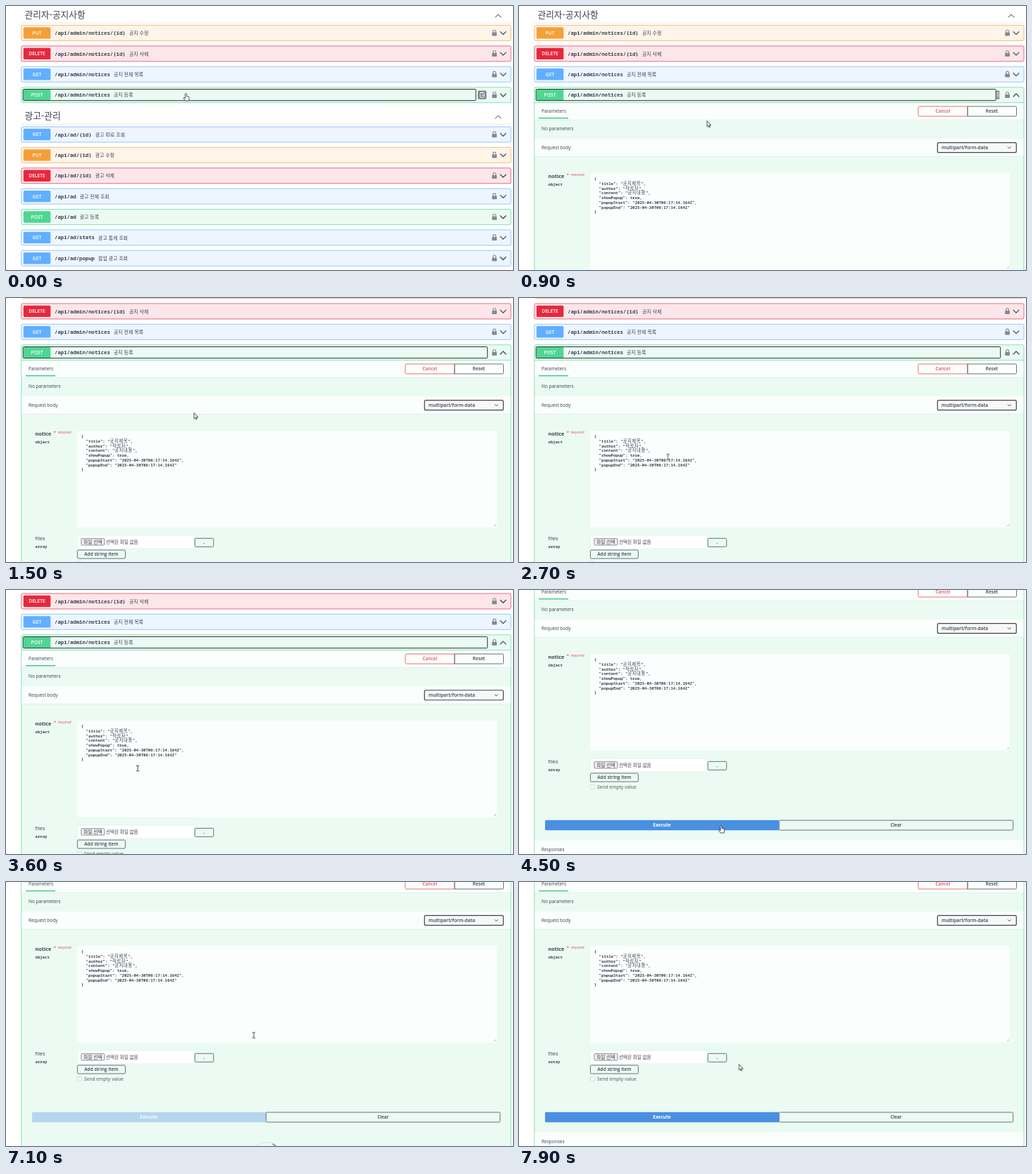
An HTML page for the animation above (8 s loop, 720x376 px).

```html
<!DOCTYPE html>
<html lang="ko">
<head>
<meta charset="utf-8">
<title>API docs</title>
<style>
html, body { margin: 0; width: 100%; height: 100%; overflow: hidden; background: #fff; }
svg { display: block; width: 720px; height: 376px; }
text { font-family: "Open Sans", "Noto Sans CJK KR", "Noto Sans CJK", sans-serif; fill: #3b4151; }
.mono { font-family: "Noto Sans Mono", "Liberation Mono", "Noto Sans CJK KR", monospace; font-weight: 600; }
.ko { font-family: "Noto Sans CJK KR", "Noto Sans CJK", sans-serif; font-weight: 400; }
.wide { letter-spacing: .6px; font-weight: 500; }
.semi { font-weight: 600; }
.bold { font-weight: 700; }
.mid { text-anchor: middle; }
.white { fill: #fff; }
.red { fill: #e8505b; }
.grey { fill: #6f7c78; }
.line { fill: none; stroke: #3b4151; stroke-linecap: round; stroke-linejoin: round; }
.btn { fill: none; stroke: #5b636c; stroke-width: .9; }

#page, #cursor, .closed, .open, .copy, .focus, .execute, .idle, .busy, .hand, .arrow, .beam {
  animation: 8s infinite;
}
#page { animation-name: scroll; animation-timing-function: ease-in-out; }
@keyframes scroll {
  0%, 13.75% { transform: translateY(0); }
  16.9%, 44.4% { transform: translateY(-49px); }
  49.4%, 100% { transform: translateY(-147px); }
}
.closed { animation-name: closed; animation-timing-function: step-end; }
.open { animation-name: open; animation-timing-function: step-end; }
@keyframes closed { 0% { visibility: visible; } 3.75%, 100% { visibility: hidden; } }
@keyframes open { 0% { visibility: hidden; } 3.75%, 100% { visibility: visible; } }

.focus { animation-name: focus; animation-timing-function: linear; }
.copy { animation-name: copy; animation-timing-function: linear; transform-origin: 682.5px 126px; }
@keyframes focus { 0%, 7.5% { width: 643px; } 13.75%, 100% { width: 659.5px; } }
@keyframes copy { 0%, 7.5% { transform: scaleX(1); } 13.75%, 100% { transform: scaleX(0); } }

.execute { animation-name: execute; animation-timing-function: ease; }
.idle { animation-name: idle; animation-timing-function: step-end; }
.busy { animation-name: busy; animation-timing-function: step-end; }
.spin { animation: spin 1s -100ms linear infinite; transform-origin: 369.5px 537px; }
@keyframes execute { 0%, 61.25% { opacity: 1; } 65%, 95% { opacity: .33; } 98%, 100% { opacity: 1; } }
@keyframes idle { 0% { opacity: 1; } 61.25% { opacity: 0; } 95%, 100% { opacity: 1; } }
@keyframes busy { 0% { opacity: 0; } 61.25% { opacity: 1; } 95%, 100% { opacity: 0; } }
@keyframes spin { to { transform: rotate(360deg); } }

#cursor { animation-name: move; animation-timing-function: ease-in-out; }
@keyframes move {
  0%, 5% { transform: translate(255.5px, 124px); }
  10%, 23.75% { transform: translate(267px, 164px); }
  40%, 46% { transform: translate(187px, 254px); }
  54%, 62% { transform: translate(287px, 335px); }
  71%, 83.75% { transform: translate(368.5px, 200.5px); }
  97%, 100% { transform: translate(312.5px, 260px); }
}
.hand { animation-name: hand; animation-timing-function: step-end; }
.arrow { animation-name: arrow; animation-timing-function: step-end; }
.beam { animation-name: beam; animation-timing-function: step-end; }
@keyframes hand { 0%, 53% { opacity: 1; } 7%, 61.25%, 100% { opacity: 0; } }
@keyframes arrow {
  0%, 29.8%, 53%, 68.3% { opacity: 0; }
  7%, 47.5%, 61.25%, 90.1%, 100% { opacity: 1; }
}
@keyframes beam { 0%, 47.5%, 90.1%, 100% { opacity: 0; } 29.8%, 68.3% { opacity: 1; } }
#cursor path { stroke-linejoin: round; stroke-linecap: round; }
</style>
</head>
<body>
<svg viewBox="0 0 720 376">
  <g id="page"></g>
  <g id="cursor">
    <path class="hand" fill="#fff" stroke="#222" stroke-width=".8"
      d="M-1 1Q0-.6 1 1V4.6L4 5.2Q5 5.6 4.8 7L4 11H-.8L-3.3 7.4Q-3.5 6-2.3 6.3L-1 7.4Z"/>
    <path class="arrow" fill="#fff" stroke="#222" stroke-width=".8"
      d="M0 0V7.8L1.8 6.2L3 9L4.2 8.5L3 5.8H5.4Z"/>
    <path class="beam" fill="none" stroke="#333" stroke-width=".9"
      d="M-1.9-4Q-.3-4 0-3.2Q.3-4 1.9-4M0-3.2V3.2M-1.9 4Q-.3 4 0 3.2Q.3 4 1.9 4"/>
  </g>
</svg>
<script>
const color = { PUT: '#f59f38', DELETE: '#e6283e', GET: '#61affe', POST: '#4fd693' };

// y is the middle of the line
const text = (x, y, str, size = 6.5, cls = '') =>
  `<text x="${x}" y="${y + size * .36}" font-size="${size}" class="${cls}">${str}</text>`;

const box = (x, y, w, h, attrs = '', r = 0) =>
  `<rect x="${x}" y="${y}" width="${w}" height="${h}" rx="${r}" ${attrs}/>`;

const group = (cls, ...parts) => `<g class="${cls}">${parts.join('')}</g>`;

const chevron = (x, y, dir, w = 1.2) =>
  `<path class="line" stroke-width="${w}" d="M${x - 4} ${y - 2 * dir}l4 ${4 * dir}l4 ${-4 * dir}"/>`;

const lock = y => box(690.2, y - .8, 6.8, 5, 'fill="#858990"', .8) +
  `<path d="M691.6 ${y - .6}v-1.6a2 2 0 0 1 4 0v1.6" fill="none" stroke="#858990" stroke-width="1.1"/>`;

const frame = (c, y, h) => box(21.8, y, 695.2, h, 'fill="#fff"', 2) +
  box(21.8, y, 695.2, h, `fill="${c}" fill-opacity=".115" stroke="${c}" stroke-opacity=".75" stroke-width=".9"`, 2);

const label = (y, method, path, note) =>
  box(24.8, y - 8.2, 38.5, 16.4, `fill="${color[method]}"`, 1.6) +
  text(44, y, method, 6.7, 'semi mid white') +
  text(69, y, path, 7.31, 'mono') +
  text(74 + path.length * 4.39, y + .2, note, 6.9, 'ko') + lock(y);

const row = (y, method, path, note) =>
  frame(color[method], y - 11, 22) + label(y, method, path, note) + chevron(706, y + .3, 1);

const section = (y, name) => text(26.5, y, name, 12.7, 'ko') + chevron(699, y + 1.3, -1, 1) +
  `<path d="M21 ${y + 11.5}H718" stroke="#3b4151" stroke-opacity=".15" stroke-width=".7"/>`;

const strip = (y, h) => box(22.5, y, 694, h, 'fill="#fff" fill-opacity=".75"') +
  `<path d="M22.5 ${y + h}H716.5" stroke="#20412f" stroke-opacity=".09" stroke-width=".8"/>`;

const button = (x, y, w, h, name) =>
  box(x, y, w, h, 'class="btn"', 1.5) + text(x + w / 2, y + h / 2, name, 6.5, 'semi mid');

const big = s => `<tspan class="ko wide" font-size="6.3">${s}</tspan>`;
const json = [
  '{', `"title": "${big('공지제목')}",`, `"author": "${big('작성자')}",`, `"content": "${big('공지내용')}",`,
  '"showPopup": true,', '"popupStart": "2025-04-30T06:17:14.164Z",', '"popupEnd": "2025-04-30T06:17:14.164Z"', '}'
].map((s, i) => text(i % 7 ? 113.6 : 106.8, 246 + i * 6.75, s, 5.67, 'mono')).join('');

const ads = [
  ['GET', '/api/ad/{id}', '광고 ID로 조회'], ['PUT', '/api/ad/{id}', '광고 수정'],
  ['DELETE', '/api/ad/{id}', '광고 삭제'], ['GET', '/api/ad', '광고 전체 조회'],
  ['POST', '/api/ad', '광고 등록'], ['GET', '/api/ad/stats', '광고 통계 조회'],
  ['GET', '/api/ad/popup', '팝업 광고 조회']
].map((a, i) => row(183 + i * 29.37, ...a)).join('');

const params = strip(138, 24.3) + text(32, 150, 'Parameters', 6.5) +
  box(28, 158.9, 42, 1.6, 'fill="#49cc90"') +
  '<path d="M637 143H568.5Q567 143 567 144.5V155.5Q567 157 568.5 157H637Z" fill="none" stroke="#e8606a" stroke-width=".9"/>' +
  '<path class="btn" d="M637 143H705Q706.5 143 706.5 144.5V155.5Q706.5 157 705 157H637Z"/>' +
  text(602, 150, 'Cancel', 6.5, 'semi mid red') + text(671.5, 150, 'Reset', 6.5, 'semi mid') +
  text(32, 175, 'No parameters');

const body = strip(189, 25.3) + text(32, 201.7, 'Request body') +
  box(594.3, 194.7, 112, 14, 'fill="#f7f9f8" stroke="#41444e" stroke-width="1.2"', 2) +
  text(600, 201.8, 'multipart/form-data', 6.75, 'semi') +
  '<path class="line" stroke-width="1" d="M694.3 200.8l2 2l2-2"/>';

const notice = text(41.5, 242, 'notice', 7.3, 'bold') + text(67.5, 241, '*', 6.5, 'red') +
  text(73.5, 240, 'required', 4.8, 'red') + text(41.5, 254.3, 'object', 5.67, 'mono') +
  box(101, 238.3, 596, 137.2, 'fill="#fff" fill-opacity=".82"', 2) + json +
  '<path d="M693 374l3-3M695 374l1-1" stroke="#8a9590" stroke-width=".6"/>';

const files = text(41.5, 391, 'files', 7.5) + text(41.5, 403.3, 'array', 5.67, 'mono') +
  box(101, 387, 166.5, 19, 'fill="#fff" stroke="#dcebe3" stroke-width=".6"', 2) +
  box(106.8, 391.6, 33.2, 9.4, 'fill="#efefef" stroke="#70757a" stroke-width=".8"', 1.4) +
  text(123.4, 396.2, '파일 선택', 6.7, 'ko mid') + text(142, 396.2, '선택된 파일 없음', 6.5, 'ko') +
  button(268.2, 391.3, 26.6, 12, '-') + button(101.4, 408, 68, 12, 'Add string item') +
  box(101.3, 424.4, 6, 6, 'fill="#f6fcf9" stroke="#c4d2cb" stroke-width=".7"', 1) +
  text(111, 428, 'Send empty value', 6.5, 'semi grey');

const actions = button(369.3, 475, 332.4, 14, 'Clear') +
  group('execute', box(37, 474.7, 332.4, 14.6, 'fill="#4990e2"', 1.5), text(203, 482, 'Execute', 6.5, 'bold mid white')) +
  group('idle', strip(503.5, 27), text(32, 517, 'Responses')) +
  group('busy', group('spin',
    '<circle cx="369.5" cy="537" r="19.3" fill="none" stroke="#555" stroke-opacity=".1" stroke-width="1.3"/>',
    '<path d="M355.85 523.35A19.3 19.3 0 0 1 383.15 523.35" fill="none" stroke="#000" stroke-opacity=".6" stroke-width="1.3"/>'));

const postY = 126.7;
document.getElementById('page').innerHTML =
  section(12.7, '관리자-공지사항') +
  row(38.4, 'PUT', '/api/admin/notices/{id}', '공지 수정') +
  row(67.9, 'DELETE', '/api/admin/notices/{id}', '공지 삭제') +
  row(97.3, 'GET', '/api/admin/notices', '공지 전체 목록') +
  group('closed', frame(color.POST, postY - 11, 22), chevron(706, postY + .3, 1), section(156.8, '광고-관리'), ads) +
  group('open', frame(color.POST, postY - 11, 560), chevron(706, postY + .3, -1),
    `<path d="M22 137.8H717" stroke="${color.POST}" stroke-width=".8"/>`,
    params, body, notice, files, actions) +
  label(postY, 'POST', '/api/admin/notices', '공지 등록') +
  box(24.2, 118.5, 643, 16.2, 'class="focus" fill="none" stroke="#2a322e" stroke-width="1"', 1.2) +
  group('copy', box(670, 120.5, 12.3, 12.3, 'fill="#7d8492"', 2),
    box(673.3, 123.4, 5.6, 6.8, 'fill="none" stroke="#fff" stroke-width=".9"', .6),
    box(674.8, 122.6, 2.6, 1.6, 'fill="#fff"'),
    '<path d="M675 127.2h4.6" stroke="#fff" stroke-width=".8"/>');
</script>
</body>
</html>
```
